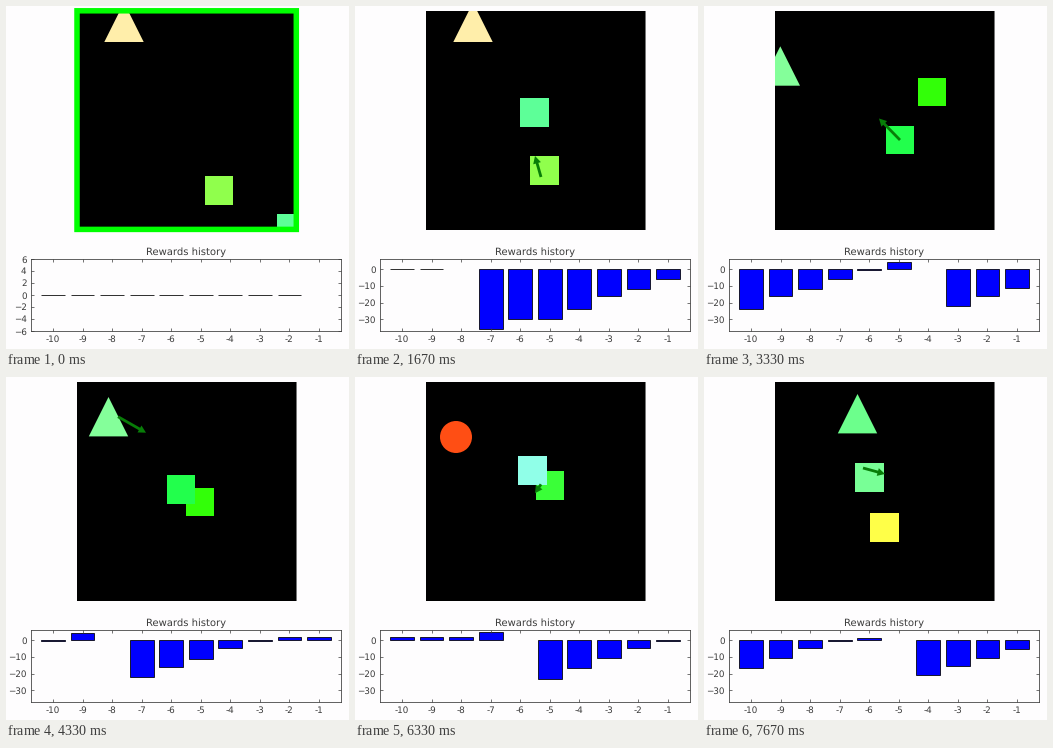
A matplotlib script for the animation above (8000 ms loop, 343 px wide and 343 px high).

```python
import numpy as np
import matplotlib.pyplot as plt
from matplotlib.animation import FuncAnimation
from matplotlib.patches import Circle, FancyArrow, Polygon, Rectangle

SIZE, DPI = 343, 98
PX = 72 / DPI  # points per pixel
LOOP, TICK = 8000, 50  # ms
PICTURES = 24  # distinct pictures in one loop
PAPER = "#fefdfe"
INK = "#3c3c3c"

plt.rcParams["font.family"] = "DejaVu Sans"
plt.rcParams["text.hinting"] = "none"

# Each move: shape name, (dx, dy), and where the drag starts relative to the centre.
EPISODES = [
    dict(
        start=0,
        shapes={
            "tri": ("triangle", "#ffeeaa", 118, 16.3),
            "lime": ("square", "#90ff4c", 212.8, 184.5),
            "teal": ("square", "#5dff98", 285.3, 222.3),
        },
        moves=[
            ("teal", (-5, -12), (14, 14)), ("teal", (-9, -39), (0, 0)), None,
            ("teal", (-29, -16), (-2, 0)), ("teal", (-28, -39), (0, 0)),
            ("teal", (-35, -10), (0, 0)), ("lime", (-23.3, -20), (0, 0)),
            ("lime", (-6, -21), (-3.5, 6.5)), ("lime", (-3, -22), (0, 0)),
        ],
    ),
    dict(
        start=10,
        shapes={
            "tri": ("triangle", "#84ff9a", 76.3, 60),
            "green": ("square", "#32ff08", 252.8, 81.5),
            "spring": ("square", "#22ff4c", 221, 145.5),
        },
        moves=[
            None, ("spring", (-25, -11.5), (-9, -2)), ("green", (-24.8, 4.5), (0, -8)),
            ("spring", (-21, -21.5), (0, 0)), ("green", (-16, 17), (0, 0)),
            ("green", (-18, 22), (0, 0)), ("tri", (26.2, -20.3), (0, 5)),
            ("tri", (28, 16), (9.5, 0)), ("green", (-10, -12), (0, 0)),
        ],
    ),
    dict(
        start=20,
        shapes={
            "ball": ("circle", "#ff4e14", 101, 60),
            "green": ("square", "#3aff38", 263, 108),
            "cyan": ("square", "#90ffe8", 205.2, 40.3),
        },
        moves=[
            ("green", (-25, 0.5), (-3, -7)), ("cyan", (-14.7, 27), (0, 0)),
            ("cyan", (-13, 26), (0, 0)), ("green", (-26, -6), (0, -8)),
            ("green", (-17, 5.8), (0, -8)), ("green", (-6, 9), (-9, -1)),
        ],
    ),
    dict(
        start=27,
        shapes={
            "tri": ("triangle", "#6cff8c", 153.5, 36.7),
            "yellow": ("square", "#ffff48", 205, 165),
            "green": ("square", "#78ff96", 232.5, 30),
        },
        moves=[
            ("yellow", (-24.5, -14.5), (0, 0)), ("green", (-17, 17), (0, 0)),
            ("green", (-25, 26.5), (0, 0)), ("green", (-25, 27), (0, 0)),
            ("green", (22, 6), (-6.5, -9.5)),
        ],
    ),
]

GAP = None  # an episode boundary has no reward
REWARDS = [GAP, -36, -30, -30, -23.5, -16, -12, -6, -0.5, 4,
           GAP, -22, -16, -11, -5, -0.5, 2, 2, 2, 4.7,
           GAP, -23.3, -16.5, -10.5, -5, -0.5, 1,
           GAP, -20.7, -15.7, -10.5, -5.5]

fig = plt.figure(figsize=(SIZE / DPI, SIZE / DPI), dpi=DPI, facecolor=PAPER)
stage = fig.add_axes([0, 0, 1, 1])
chart = fig.add_axes([25 / SIZE, 1 - 325 / SIZE, 310 / SIZE, 72 / SIZE])
shown_step = None


def make_shape(kind, color, x, y):
    style = dict(facecolor=color, linewidth=0)
    if kind == "square":
        half = 14.2
        return Rectangle((x - half, y - half), 2 * half, 2 * half, **style)
    if kind == "circle":
        return Circle((x, y), 16, **style)
    half = 19.7
    return Polygon([(x, y - half), (x + half, y + half), (x - half, y + half)], **style)


def draw_stage(step):
    stage.clear()
    stage.set(xlim=(0, SIZE), ylim=(SIZE, 0))
    stage.axis("off")
    stage.add_patch(Rectangle((290, 5), 1, 219, facecolor="#777777", linewidth=0))
    board = stage.add_patch(Rectangle((71, 5), 219, 219, facecolor="black", linewidth=0))

    episode = [e for e in EPISODES if e["start"] <= step][-1]
    local = step - episode["start"]
    moves = episode["moves"]
    centres = {name: np.array(s[2:], float) for name, s in episode["shapes"].items()}
    for move in moves[:local]:
        if move:
            centres[move[0]] += move[1]

    for name, (kind, color, *_) in episode["shapes"].items():
        patch = stage.add_patch(make_shape(kind, color, *centres[name]))
        patch.set_clip_path(board)

    if local < len(moves) and moves[local]:
        name, drag, offset = moves[local]
        arrow = FancyArrow(*(centres[name] + offset), *drag, width=2.8, head_width=8,
                           head_length=7.5, length_includes_head=True,
                           facecolor="#087d08", linewidth=0)
        stage.add_patch(arrow).set_clip_path(board)

    if local == 0:
        stage.add_patch(Rectangle((71, 4.8), 219.3, 218.6, fill=False, snap=False,
                                  edgecolor="#00ff00", linewidth=5.5 * PX))


def draw_chart(step):
    chart.clear()
    chart.set_facecolor(PAPER)
    history = [0] * 9 + REWARDS[:step + 1]
    bars = [(x, r) for x, r in zip(range(-10, 0), history[-10:]) if r is not None]
    chart.bar(*zip(*bars), width=0.8, color="#0000ff", edgecolor="black", linewidth=0.8 * PX)

    chart.set_xlim(-10.75, -0.25)
    chart.set_xticks(range(-10, 0), [str(x) for x in range(-10, 0)])
    if step == 0:
        chart.set_ylim(-6, 6)
        chart.set_yticks(range(-6, 7, 2))
    else:
        chart.set_ylim(-36.9, 6)
        chart.set_yticks(range(-30, 1, 10))
    chart.tick_params(direction="in", top=True, right=True, length=3 * PX, width=0.7 * PX,
                      pad=4.5 * PX, labelsize=8.7 * PX, color=INK, labelcolor=INK)
    for spine in chart.spines.values():
        spine.set(linewidth=0.8 * PX, color=INK)
    chart.set_title("Rewards history", fontsize=10.04 * PX, pad=4 * PX, color=INK)


def draw(frame):
    # The agent acts four times a second, shown at three pictures a second;
    # a picture that becomes due within a tick is shown from the tick's start.
    picture = (frame * TICK + TICK - 1) * PICTURES // LOOP
    show(round(picture * 4 / 3))
    return []


def show(step):
    global shown_step
    if step != shown_step:
        draw_stage(step)
        draw_chart(step)
        shown_step = step


anim = FuncAnimation(fig, draw, frames=LOOP // TICK, interval=TICK,
                     init_func=lambda: draw(0), repeat=True, repeat_delay=0)
plt.show()
```
